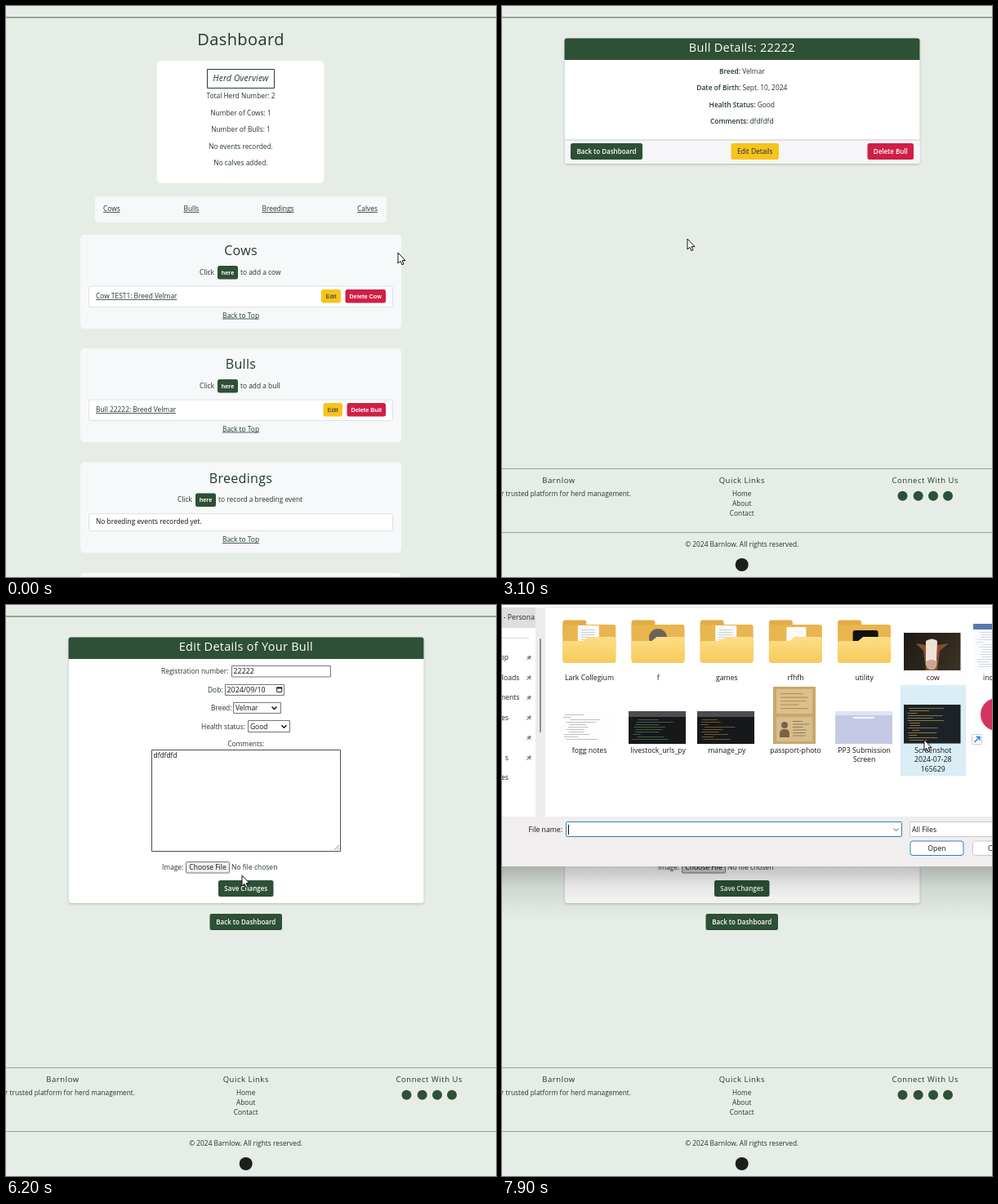
Write an HTML page with a canvas that moves like this. It is 600x699 px and loops after 8 s.

```html
<!DOCTYPE html>
<html lang="en">
<head>
<meta charset="utf-8">
<title>Herd dashboard</title>
<style>
html, body { margin: 0; width: 100%; height: 100%; overflow: hidden; background: #e6ede6; }
canvas { display: block; width: 600px; height: 699px; }
</style>
</head>
<body>
<canvas id="stage" width="600" height="699"></canvas>
<script>
const ctx = document.getElementById('stage').getContext('2d');
const LOOP = 8000;
const GREEN = '#2d5036', INK = '#22382a', YELLOW = '#f8c41a', RED = '#d01f44', PANEL = '#f6f8f9';
const SANS = '"Open Sans", sans-serif', ARIAL = '"Liberation Sans", sans-serif';
const APP = 'Barnlow', BREED = 'Velmar';

const clamp = v => Math.max(0, Math.min(1, v));
const smooth = v => v * v * (3 - 2 * v);
const noise = n => { const v = Math.sin(n * 12.9898) * 43758.5453; return v - Math.floor(v); };

// ---- drawing helpers ----
function rect(x, y, w, h, fill, r = 0, stroke) {
  ctx.beginPath();
  ctx.roundRect(x, y, w, h, r);
  if (fill) { ctx.fillStyle = fill; ctx.fill(); }
  if (stroke) { ctx.strokeStyle = stroke; ctx.lineWidth = 1; ctx.stroke(); }
}

function circle(x, y, r, fill) {
  ctx.beginPath();
  ctx.arc(x, y, r, 0, 7);
  ctx.fillStyle = fill;
  ctx.fill();
}

function line(color, width, ...points) {
  ctx.beginPath();
  for (let i = 0; i < points.length; i += 2) ctx.lineTo(points[i], points[i + 1]);
  ctx.strokeStyle = color;
  ctx.lineWidth = width;
  ctx.stroke();
}

function text(str, x, y, { size = 8.4, align = 'left', font = SANS, style = '', color = INK, gap = 0, under } = {}) {
  ctx.font = `${style} ${size}px ${font}`;
  ctx.letterSpacing = gap + 'px';
  ctx.textAlign = align;
  ctx.fillStyle = color;
  ctx.fillText(str, x, y);
  const w = ctx.measureText(str).width;
  if (under) {
    const left = align === 'center' ? x - w / 2 : x;
    line(color, 0.8, left, y + 1.5, left + w, y + 1.5);
  }
  return w;
}

const centered = (str, x, y, opts) => text(str, x, y, { align: 'center', ...opts });

function button(x, y, w, h, label, fill, opts) {
  rect(x, y, w, h, fill, 2.5);
  centered(label, x + w / 2, y + h / 2 + 2.6, { size: 8, style: '600', color: '#fff', ...opts });
}

const smallButton = (x, y, w, label, fill, opts) =>
  button(x, y, w, 16.5, label, fill, { size: 7.3, style: 'bold', font: ARIAL, ...opts });

const chevron = (x, y, color = '#111', w = 1.5) => line(color, w, x - 3, y - 1.5, x, y + 1.5, x + 3, y - 1.5);

// ---- pages ----
function background() {
  rect(0, 0, 600, 699, '#e6ede6');
  line('#41604a', 1, 0, 14, 600, 14);
}

function section(y, h, title, action, clickX, here) {
  rect(91, y, 393, h, PANEL, 5);
  centered(title, 287.5, y + 25, { size: 16, gap: 0.3 });
  text('Click', clickX, y + 48.5);
  smallButton(here, y + 38, 25, 'here', GREEN);
  text(action, here + 28, y + 48.5);
  rect(101.5, y + 63, 372, h === 115 ? 25.5 : 21, '#fff', 2, '#dde3e4');
  centered('Back to Top', 287.5, y + h - 13.5, { under: true });
}

function dashboard(hoverBull) {
  centered('Dashboard', 287.5, 48, { size: 20, gap: 0.4 });
  rect(185, 67, 204.5, 150, '#fff', 5);
  rect(246.5, 77.5, 82, 23, null, 0, '#2b3a30');
  centered('Herd Overview', 287.5, 92, { size: 10.3, style: 'italic', gap: 0.2 });
  ['Total Herd Number: 2', 'Number of Cows: 1', 'Number of Bulls: 1', 'No events recorded.', 'No calves added.']
    .forEach((s, i) => centered(s, 287.5, 113.3 + i * 20.4));

  rect(109, 233, 357, 32, PANEL, 4);
  [['Cows', 119], ['Bulls', 217.5], ['Breedings', 313.5], ['Calves', 430]]
    .forEach(([s, x]) => text(s, x, 251, { under: true }));

  section(280, 115, 'Cows', 'to add a cow', 237, 259);
  text(`Cow TEST1: Breed ${BREED}`, 110, 358, { under: true });
  smallButton(386, 347, 24, 'Edit', YELLOW, { style: '', size: 7.6, color: '#1c2452' });
  smallButton(415.5, 347, 49.5, 'Delete Cow', RED);

  section(419, 115, 'Bulls', 'to add a bull', 237, 259);
  text(`Bull 22222: Breed ${BREED}`, 110, 497, { under: !hoverBull });
  smallButton(388.5, 486, 23.5, 'Edit', YELLOW, { style: '', size: 7.6, color: '#1c2452' });
  smallButton(417.5, 486, 47.5, 'Delete Bull', RED);

  section(558.5, 111, 'Breedings', 'to record a breeding event', 210, 232);
  text('No breeding events recorded yet.', 110, 634, { color: '#111' });
  rect(91, 694, 393, 20, PANEL, 5);
}

function footer() {
  line('#93a598', 1, 0, 566.5, 600, 566.5);
  line('#93a598', 1, 0, 644.5, 600, 644.5);
  [[APP, 69.5], ['Quick Links', 293.8], ['Connect With Us', 518.3]]
    .forEach(([s, x]) => centered(s, x, 584, { size: 9.5, gap: 0.55 }));
  text('Your trusted platform for herd management.', 158, 599.5, { align: 'right', size: 8.3 });
  ['Home', 'About', 'Contact'].forEach((s, i) => centered(s, 293.7, 599.8 + i * 12.2, { size: 8.3 }));
  [490.5, 509.7, 528, 546].forEach(x => circle(x, 599.7, 6, GREEN));
  centered(`© 2024 ${APP}. All rights reserved.`, 293.7, 661.5);
  circle(293.7, 684, 8, '#1c1f1e');
}

function card(bottom, title) {
  ctx.save();
  ctx.shadowColor = 'rgba(0,0,0,.22)';
  ctx.shadowBlur = 3;
  ctx.shadowOffsetY = 1;
  rect(77, 40, 434.5, bottom - 40, '#fff', 3);
  ctx.restore();
  rect(76.5, 39.5, 435, 26.5, GREEN, [3, 3, 0, 0]);
  centered(title, 293.8, 56.3, { size: 14.5, gap: 0.28, color: '#fff' });
}

function details(hoverEdit) {
  card(193, 'Bull Details: 22222');
  [['Breed:', BREED], ['Date of Birth:', 'Sept. 10, 2024'], ['Health Status:', 'Good'], ['Comments:', 'dfdfdfd']]
    .forEach(([label, value], i) => {
      const y = 82.5 + i * 20.5, bold = { style: '600' };
      ctx.font = `600 8.4px ${SANS}`;
      ctx.letterSpacing = '0px';
      const labelWidth = ctx.measureText(label + ' ').width;
      ctx.font = `8.4px ${SANS}`;
      const x = 293.8 - (labelWidth + ctx.measureText(value).width) / 2;
      text(label, x, y, bold);
      text(value, x + labelWidth, y);
    });
  rect(77, 164, 434.5, 29, '#f6f6f8', [0, 0, 3, 3]);
  line('#c6cbc8', 1, 77, 164, 511.5, 164);
  button(84, 168, 88, 20, 'Back to Dashboard', GREEN);
  button(280.5, 168, 58.5, 20, 'Edit Details', hoverEdit ? '#e5ad0a' : YELLOW, { size: 8.4, style: '', color: '#1c2452' });
  button(447.5, 168, 56.5, 20, 'Delete Bull', RED);
}

function form(fileState) {
  const dark = { color: '#111' }, border = '#767676';
  card(365, 'Edit Details of Your Bull');
  text('Registration number:', 190, 83.5);
  rect(276.5, 74.5, 121, 13.5, '#fff', 0, border);
  text('22222', 278.5, 83.5, { ...dark, size: 8.9 });
  text('Dob:', 247, 106.5);
  rect(268.5, 97.5, 72, 13, '#fff', 0, border);
  text('2024/09/10', 270.5, 106.7, { ...dark, size: 8.9 });
  rect(331.7, 101, 6, 5.6, null, 0.5, '#222');
  rect(331.2, 100.5, 7, 2, '#222');
  text('Breed:', 251, 128.7);
  rect(278.5, 119.5, 58, 13, '#fff', 0, border);
  text(BREED, 281, 129, dark);
  chevron(328.5, 126);
  text('Health status:', 239, 151.5);
  rect(296.5, 141.5, 51, 14, '#fff', 0, border);
  text('Good', 299, 151.7, dark);
  chevron(340.5, 148.7);
  centered('Comments:', 293.7, 173);
  rect(178.5, 177.5, 231, 124, '#fff', 0, '#4e4e4e');
  text('dfdfdfd', 180.5, 186.7, dark);
  line('#777', 0.8, 402, 300, 408, 294);
  line('#777', 0.8, 405.5, 300, 408, 297.5);
  text('Image:', 191, 323.8);
  rect(220.5, 314.5, 53, 13.5, fileState, 1, border);
  centered('Choose File', 247, 323.8, { ...dark, size: 8.5 });
  text('No file chosen', 276, 324, { size: 8.5 });
  button(260, 337, 67.5, 20, 'Save Changes', GREEN);
  button(249.5, 378, 88.5, 20, 'Back to Dashboard', GREEN);
}

function statusBar(path) {
  rect(-4, 685.5, 174, 18, '#d3e2f6', 3, '#b4c6dd');
  text(`dcab8e.herokuapp.com/${path}/36/`, 150, 697, { align: 'right', size: 8.9, color: '#34445c' });
}

// ---- file picker ----
function folder(x, inner) {
  rect(x, 18.5, 29, 20, '#e4ac43', 3);
  rect(x, 24, 65, 44, '#e9b54e', 3);
  inner(x + 32.5);
  const g = ctx.createLinearGradient(0, 36, 0, 71);
  g.addColorStop(0, '#fee08a');
  g.addColorStop(1, '#f6ca5b');
  ctx.fillStyle = g;
  ctx.fill(new Path2D(`M${x} 47q0-3 3-3h22l6-5h31q3 0 3 3v26q0 3-3 3h-59q-3 0-3-3z`));
}

function screenshot(x, y, w, h, bg, colors, seed, header) {
  rect(x, y, w, h, bg);
  if (header) rect(x, y, w, 7, header);
  for (let row = header ? 10 : 4; row < h - 4; row += 3) {
    const n = seed + row;
    ctx.globalAlpha = 0.75;
    rect(x + 4 + noise(n) * 8, y + row, 8 + noise(n + 0.5) * w * 0.55, 1, colors[row % colors.length]);
    ctx.globalAlpha = 1;
  }
}

function cowPhoto() {
  const g = ctx.createLinearGradient(492, 34, 561, 80);
  g.addColorStop(0, '#1d1a16');
  g.addColorStop(1, '#3a3323');
  rect(492, 34, 69.5, 46, g);
  ctx.fillStyle = '#8b4d2c';
  ctx.fill(new Path2D('M507 47l12 2q8-6 15 0l13-2-11 9-3 24h-14l-3-24z'));
  ctx.fillStyle = '#eee2d6';
  ctx.fill(new Path2D('M519 44q8-5 14 0l-1 22q2 13-6 13t-7-13z'));
  ctx.fillStyle = '#cda596';
  ctx.fill(new Path2D('M519 69q7-4 13 0 1 10-6 10t-7-10z'));
}

function passport() {
  rect(332, 100, 52, 70, '#c9a76b');
  rect(336, 103, 44, 30, '#dcc08b');
  rect(336, 137, 44, 30, '#d5bd8d');
  circle(346, 147, 4, '#7c6245');
  rect(340, 152, 12, 10, '#7c6245', [5, 5, 0, 0]);
  for (let i = 0; i < 6; i++) rect(356, 142 + i * 3.5, 12 + noise(i) * 9, 1, '#9a7c4f');
  for (let i = 0; i < 5; i++) rect(341, 108 + i * 4.5, 20 + noise(i + 9) * 14, 1.2, '#b5935a');
}

function files(hover) {
  const paper = cx => {
    rect(cx - 14, 25, 26, 30, '#fafafa', 1);
    for (let y = 30; y < 44; y += 3) rect(cx - 10, y, 17, 0.8, '#b9c6d3');
  };
  const tile = cx => rect(cx - 14, 31, 31, 24, '#121212', 3);
  [paper, cx => circle(cx, 40, 11, '#6d6257'), paper, cx => rect(cx - 11, 27, 24, 30, '#fafafa', 1), tile]
    .forEach((inner, i) => folder(74.3 + i * 84.2, inner));

  const name = (i, y, ...rows) => rows.forEach((s, k) =>
    centered(s, 107 + i * 84.15, y + k * 11.3, { size: 8.7, color: '#151515' }));
  if (hover) rect(488, 98, 80, 111, '#d9eef5');
  ['Lark Collegium', 'f', 'games', 'rfhfh', 'utility', 'cow'].forEach((s, i) => name(i, 91.5, s));
  cowPhoto();
  screenshot(577, 23, 50, 58, '#fbfbfd', ['#8aa0c4', '#c5cede', '#79a47f'], 5, '#5a78b0');
  text('inc', 589, 91.5, { size: 8.7, color: '#151515' });

  screenshot(71, 130, 70, 40, '#fdfdfd', ['#555', '#aaa', '#888'], 20);
  screenshot(155, 130, 70, 40, '#17181a', ['#8a6a3c', '#517348', '#777'], 31, '#4b4d52');
  screenshot(239, 130, 70, 40, '#17181a', ['#777', '#8a6a3c', '#517348'], 47, '#4b4d52');
  passport();
  rect(408, 130, 70, 40, '#c5c9e6');
  rect(408, 130, 70, 5, '#dfe3f2');
  rect(430, 137, 26, 2, '#f5f6fd');
  screenshot(492, 122, 69.5, 47.5, '#1c2227', ['#4f8a62', '#b08c46', '#53829a'], 63);
  circle(606, 134, 20, '#d6345f');
  rect(575.5, 158.5, 12, 12, '#fff', 1, '#ccc');
  line('#1e78c8', 1.3, 578.5, 168, 585, 161.5);
  line('#1e78c8', 1.3, 580.5, 161.5, 585, 161.5, 585, 166);
  name(0, 181, 'fogg notes');
  name(1, 181, 'livestock_urls_py');
  name(2, 181, 'manage_py');
  name(3, 181, 'passport-photo');
  name(4, 181, 'PP3 Submission', 'Screen');
  name(5, 181, 'Screenshot', '2024-07-28', '165629');
}

function sidebar() {
  const opts = { size: 8.7, color: '#222' };
  rect(0, 3, 41, 25, '#dedede');
  text('l - Persona', 40, 18, { ...opts, align: 'right' });
  line('#d5d5d5', 1, 0, 40.5, 33, 40.5);
  ['op', 'loads', 'ments', 'es', '', 's', 'es'].forEach((s, i) => {
    const y = 67 + i * 24.5;
    text(s, s.length > 3 ? 21.5 : 8, y, { ...opts, align: 'right' });
    if (i < 6) {
      line('#7d8790', 3, 32, y - 1.5, 35, y - 4.5);
      line('#7d8790', 1, 30, y + 0.5, 33, y - 2.5);
      line('#7d8790', 1, 31, y - 4.5, 35.5, y);
    }
  });
}

function picker(age, hover) {
  const open = smooth(clamp(age / 200)), scale = 0.928 + 0.072 * open;
  ctx.save();
  ctx.translate(251, 91);
  ctx.scale(scale, scale);
  ctx.translate(-251, -91);

  const shade = ctx.createLinearGradient(0, 320, 0, 385);
  shade.addColorStop(0, 'rgba(0,0,0,.25)');
  shade.addColorStop(0.4, 'rgba(0,0,0,.09)');
  shade.addColorStop(1, 'rgba(0,0,0,0)');
  rect(-100, 320, 800, 65, shade);

  ctx.globalAlpha = 0.6 + 0.4 * open;
  rect(-100, -50, 141, 309, '#fff');
  rect(41, -50, 12, 53, '#fff');
  rect(41, 3, 12, 256, '#ececec');
  rect(53, -50, 650, 309, '#fff');
  rect(-100, 259, 800, 61, '#f1eef0');
  rect(46, 41, 1.8, 115, '#858585', 1);
  const ready = age >= 200, blue = ready && '#2f83ad', gray = ready && '#c8c8c8';
  rect(78.5, 265.5, 411, 18, '#fff', 1, blue);
  rect(499.5, 265.5, 120, 18, '#fff', 1, gray);
  rect(500, 289, 65, 17.5, '#fff', 3, blue);
  rect(576.5, 289, 65, 17.5, '#fff', 3, gray);
  if (!ready) rect(32, 268, 42, 12, '#fff');
  ctx.globalAlpha = 1;

  if (ready) {
    const opts = { size: 8.7, color: '#151515' };
    text('File name:', 74, 277.5, { ...opts, align: 'right' });
    line('#111', 1, 81.5, 269, 81.5, 281);
    chevron(482.5, 275, '#555', 1);
    text('All Files', 502, 277.5, opts);
    centered('Open', 532.5, 300.5, opts);
    text('Cancel', 595, 300.5, opts);
    sidebar();
    line('#e4e4e4', 1, 53, 2.5, 600, 2.5);
    files(hover);
  }
  ctx.restore();
}

// ---- pointer: time, x, y ----
const PATH = [
  [0, 480, 302], [100, 480, 302], [1400, 172, 496], [1800, 172, 496], [2600, 225, 394],
  [3100, 227, 285], [3500, 308, 176], [3800, 309, 174], [4350, 309, 174], [4700, 311, 168],
  [5500, 311, 168], [6200, 289, 331], [6400, 312, 333], [6700, 253, 326], [6950, 253, 326],
  [7700, 499, 177], [7900, 517, 165], [LOOP, 517, 165]
];
const ARROW = new Path2D('M0 0V13L3 10.3 5 14.7 7 13.8 5.1 9.6H9Z');
const HAND = new Path2D('M-1.5 1Q0-.9 1.5 1V6.3Q3 5.4 4 6.9 5.5 6 6.5 7.6 8.5 7 8.5 9V12Q8 15 6.5 17H0Q-1.5 14-4 11.5-5 9.4-3 9.4L-1.5 11Z');

function pointerAt(t) {
  const i = PATH.findIndex(p => p[0] > t);
  const [t0, x0, y0] = PATH[i - 1], [t1, x1, y1] = PATH[i];
  const k = smooth((t - t0) / (t1 - t0));
  return [x0 + (x1 - x0) * k, y0 + (y1 - y0) * k];
}

function drawPointer(x, y, kind) {
  ctx.save();
  ctx.translate(x, y);
  if (kind === 'beam') {
    line('#111', 1, 0.5, -6, 0.5, 6);
    line('#111', 1, -2, -6, 3, -6);
    line('#111', 1, -2, 6, 3, 6);
  } else {
    const shape = kind === 'hand' ? HAND : ARROW;
    ctx.fillStyle = '#fff';
    ctx.strokeStyle = '#111';
    ctx.lineWidth = 1;
    ctx.fill(shape);
    ctx.stroke(shape);
  }
  ctx.restore();
}

function draw(t) {
  const [x, y] = pointerAt(t);
  const within = (from, to) => t >= from && t < to;
  const inside = (l, top, r, b) => x > l && x < r && y > top && y < b;
  const onLink = within(1350, 1900), onEdit = within(3450, 4400);
  let kind = onLink || onEdit ? 'hand' : 'arrow';

  background();
  if (t < 1800) dashboard(onLink);
  else {
    footer();
    if (t < 4000) details(onEdit);
    else {
      form(t >= 6800 ? '#d6d6d6' : t >= 6600 ? '#e3e3e3' : '#efefef');
      if (t < 6900 && !onEdit && inside(178, 177, 410, 302)) kind = 'beam';
    }
  }
  if (within(1450, 2200)) statusBar('view_bull');
  if (within(3600, 4400)) statusBar('edit_bull');
  if (t >= 6900) picker(t - 6900, inside(488, 98, 568, 209));
  drawPointer(x, y, kind);
}

function tick() {
  draw(performance.now() % LOOP);
  requestAnimationFrame(tick);
}
tick();
</script>
</body>
</html>
```
